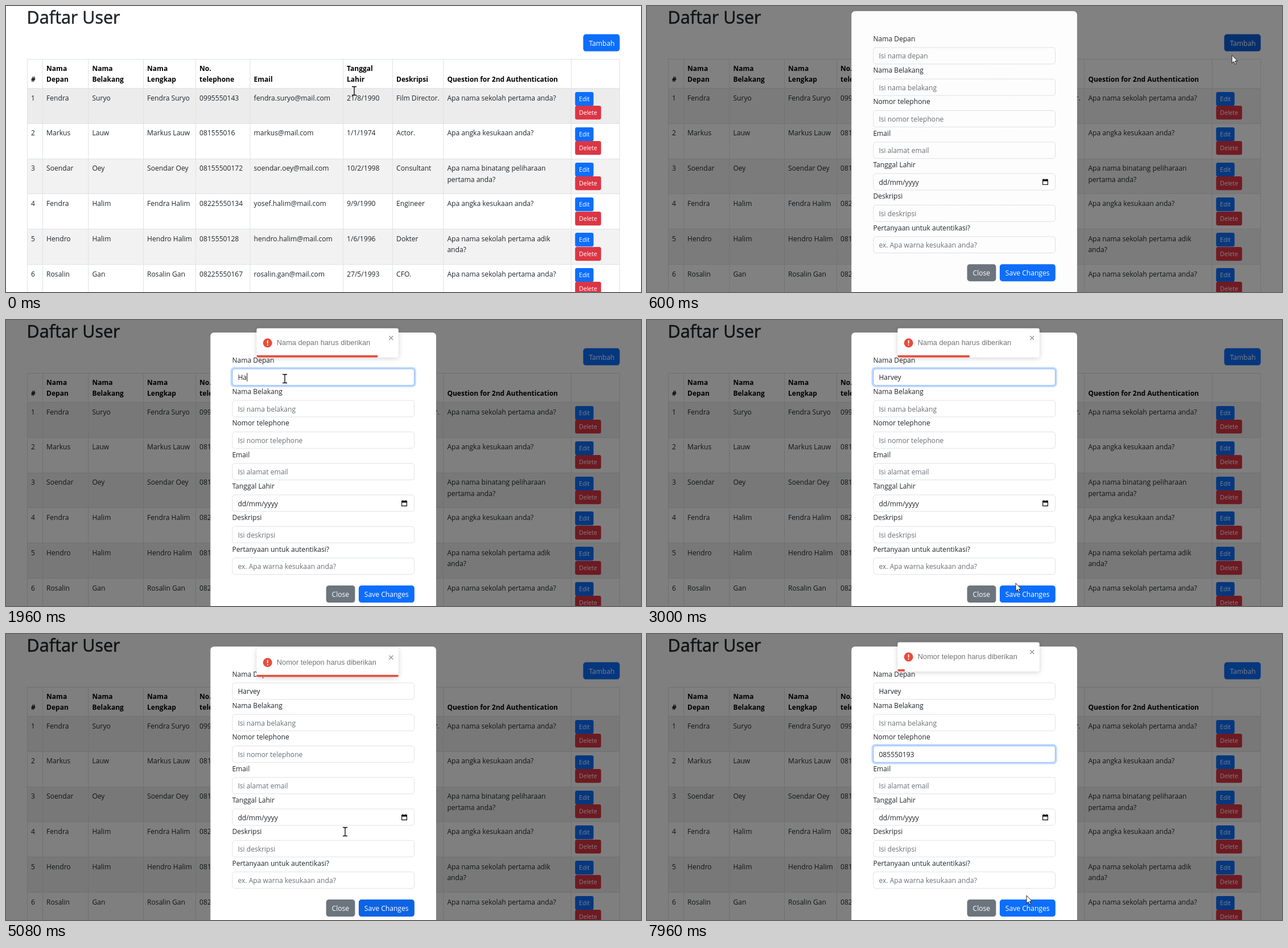
An HTML page for the animation above (8 s loop, 1116 by 502 pixels).

```html
<!DOCTYPE html>
<html lang="id">
<head>
<meta charset="utf-8">
<title>Daftar User</title>
<style>
html, body { margin: 0; width: 100%; height: 100%; overflow: hidden; background: #fff; }
svg { display: block; width: 1116px; height: 502px; }
text { font: 12.1px "Open Sans", "Noto Sans", sans-serif; fill: #212529; white-space: pre; }
.title { font-size: 30.5px; stroke: #212529; stroke-width: .6px; }
.head { font-size: 12px; font-weight: 700; fill: #000; }
.light { fill: #fff; }
.small { font-size: 10.6px; fill: #fff; }
.hint { fill: #6a6f75; }
.note { font: 12.8px "Liberation Sans", Arial, sans-serif; fill: #757575; }
.box { fill: #fff; stroke: #dee2e6; }
.toast { filter: drop-shadow(0 1px 4px rgba(0,0,0,.13)) drop-shadow(0 2px 6px rgba(0,0,0,.06)); }
</style>
</head>
<body>
<svg id="stage" viewBox="0 0 1116 502"></svg>
<script>
const LOOP = 8000;
const BLUE = [13, 110, 253], DARK = [11, 94, 215];
const stage = document.getElementById('stage');

function add(parent, tag, attrs = {}, content) {
  const el = document.createElementNS('http://www.w3.org/2000/svg', tag);
  for (const k in attrs) el.setAttribute(k, attrs[k]);
  if (content !== undefined) el.textContent = content;
  parent.appendChild(el);
  return el;
}
const label = (parent, x, y, str, cls = '') => add(parent, 'text', { x, y, class: cls }, str);
const rect = (parent, x, y, width, height, fill, rx = 0) =>
  add(parent, 'rect', { x, y, width, height, rx, fill });
const rgb = c => `rgb(${c.map(Math.round)})`;

// ---------- page with table ----------
const page = add(stage, 'g');
rect(page, 0, 0, 1116, 502, '#fff');
label(page, 36.6, 31, 'Daftar User', 'title');
const addButton = rect(page, 1014.4, 49.6, 64.2, 30, rgb(BLUE), 4.8);
label(page, 1024.4, 69.6, 'Tambah', 'light');

const cols = [37.5, 64.5, 144.8, 241.5, 333.5, 429, 592.5, 679.5, 768.8, 993.3, 1078.5];
const heads = ['|#', 'Nama|Depan', 'Nama|Belakang', 'Nama|Lengkap', 'No.|telephone',
  '|Email', 'Tanggal|Lahir', '|Deskripsi', '|Question for 2nd Authentication'];
const rows = [
  ['Fendra', 'Suryo', '0995550143', 'fendra.suryo@mail.com', '21/8/1990', 'Film Director.', 'Apa nama sekolah pertama anda?'],
  ['Markus', 'Lauw', '081555016', 'markus@mail.com', '1/1/1974', 'Actor.', 'Apa angka kesukaan anda?'],
  ['Soendar', 'Oey', '08155500172', 'soendar.oey@mail.com', '10/2/1998', 'Consultant', 'Apa nama binatang peliharaan|pertama anda?'],
  ['Fendra', 'Halim', '08225550134', 'yosef.halim@mail.com', '9/9/1990', 'Engineer', 'Apa angka kesukaan anda?'],
  ['Hendro', 'Halim', '0815550128', 'hendro.halim@mail.com', '1/6/1996', 'Dokter', 'Apa nama sekolah pertama adik|anda?'],
  ['Rosalin', 'Gan', '08225550167', 'rosalin.gan@mail.com', '27/5/1993', 'CFO.', 'Apa nama sekolah pertama anda?']
];
const TOP = 144.3, PITCH = 61.85, LINE = 19.2;
const cell = (col, y, str, cls) => str.split('|').forEach((s, i) =>
  s && label(page, cols[col] + 6.6, y + i * LINE, s, cls));

const stripes = rows.map((r, i) =>
  rect(page, 37.5, TOP + i * PITCH, 1041, PITCH, i % 2 ? '#fff' : '#f2f2f2'));
for (const x of cols) rect(page, x - .5, 93, 1, 409, '#dee2e6');
for (let i = -1; i < 6; i++)
  rect(page, 37, i < 0 ? 93 : Math.round(TOP - .4 + i * PITCH), 1042, 1, '#dee2e6');

function rowButton(y, width, fill, name) {
  rect(page, 1000.2, Math.round(y), width, 24.2, fill, 3.2);
  label(page, 1007, Math.round(y) + 16, name, 'small');
}
heads.forEach((h, i) => cell(i, 113.8, h, 'head'));
rows.forEach(([first, last, ...rest], i) => {
  const y = TOP + i * PITCH;
  [String(i + 1), first, last, `${first} ${last}`, ...rest]
    .forEach((s, c) => cell(c, y + 21.3, s));
  rowButton(y + 6.6, 32.4, rgb(BLUE), 'Edit');
  rowButton(y + 30.9, 45.6, '#dc3545', 'Delete');
});
const shade = rect(stage, 0, 0, 1116, 502, '#000');

// ---------- modal form ----------
const modal = add(stage, 'g');
rect(modal, 359.3, 22, 396.6, 540, '#fff', 6.4);
const fields = [
  ['Nama Depan', 'Isi nama depan'], ['Nama Belakang', 'Isi nama belakang'],
  ['Nomor telephone', 'Isi nomor telephone'], ['Email', 'Isi alamat email'],
  ['Tanggal Lahir', 'dd/mm/yyyy'], ['Deskripsi', 'Isi deskripsi'],
  ['Pertanyaan untuk autentikasi?', 'ex. Apa warna kesukaan anda?']
].map(([name, hint], i) => {
  const y = i * 55.3;
  label(modal, 397.4, y + 74.8, name);
  const ring = rect(modal, 394.5, y + 82.4, 326.2, 35.6, 'rgba(13,110,253,.25)', 7);
  const box = add(modal, 'rect', { x: 397.9, y: y + 85.8, width: 319.6, height: 28.9, rx: 4.5, class: 'box' });
  const text = label(modal, 407.4, y + 105.4, hint, i === 4 ? '' : 'hint');
  const caret = rect(modal, 407, y + 93, 1, 15, '#212529');
  return { hint, ring, box, text, caret };
});
add(modal, 'path', { d: 'M695.6 318h8.8v8.4h-8.8z', fill: 'none', stroke: '#000', 'stroke-width': 1.1 });
add(modal, 'path', { d: 'M695 317.4h10v3h-10zM696.8 316.2h1.2v2h-1.2zM702 316.2h1.2v2h-1.2z', fill: '#000' });
rect(modal, 562.6, 466.1, 50.8, 30, '#6c757d', 4.8);
label(modal, 572.6, 486.2, 'Close', 'light');
const saveButton = rect(modal, 619.9, 466.1, 97.9, 30, rgb(BLUE), 4.8);
label(modal, 629.8, 486.2, 'Save Changes', 'light');

// ---------- toast ----------
const toast = add(stage, 'g');
const clip = add(add(stage, 'defs'), 'clipPath', { id: 'card' });
rect(clip, 440.4, 14.6, 249.4, 51.2, '#000', 3.2);
add(toast, 'rect', { x: 440.4, y: 14.6, width: 249.4, height: 51.2, rx: 3.2, fill: '#fff', class: 'toast' });
add(toast, 'circle', { cx: 459.7, cy: 40.3, r: 8, fill: '#e74c3c' });
rect(toast, 458.8, 35.6, 1.8, 5.8, '#fff', .7);
add(toast, 'circle', { cx: 459.7, cy: 44, r: 1.1, fill: '#fff' });
const note = label(toast, 475.8, 44.4, '', 'note');
add(toast, 'path', { d: 'M673.2 28l7 7m0-7l-7 7', stroke: '#9a9a9a', 'stroke-width': 1.5 });
const bar = rect(add(toast, 'g', { 'clip-path': 'url(#card)' }), 440.4, 61.9, 249.4, 4, '#e74c3c');

// ---------- pointer ----------
const arrow = add(stage, 'path', {
  d: 'M0 0V14l3.2-3 2.2 5 2.2-1-2.2-4.8h4.4z', fill: '#fff', stroke: '#111', 'stroke-width': .9 });
const beam = add(stage, 'path', {
  d: 'M-4-7.5h3l1 1 1-1h3M0-6.5v13M-4 7.5h3l1-1 1 1h3', fill: 'none', stroke: '#000', 'stroke-width': 1.3 });

// ---------- motion ----------
const clamp = v => Math.min(1, Math.max(0, v));
const mix = (a, b, p) => a + (b - a) * p;
const smooth = p => p * p * (3 - 2 * p);

function bezier(x1, y1, x2, y2) {
  const at = (a, b, u) => 3 * a * u * (1 - u) ** 2 + 3 * b * u * u * (1 - u) + u ** 3;
  return x => {
    let lo = 0, hi = 1;
    for (let i = 0; i < 24; i++) {
      const m = (lo + hi) / 2;
      if (at(x1, x2, m) < x) lo = m; else hi = m;
    }
    return at(y1, y2, lo);
  };
}
const easeOut = bezier(0, 0, .58, 1), bounce = bezier(.215, .61, .355, 1);

// steps are [time, value, ...]; returns the values at t
function track(steps, t, ease) {
  const n = steps.findIndex(s => s[0] > t);
  if (n === 0) return steps[0].slice(1);
  if (n < 0) return steps[steps.length - 1].slice(1);
  const a = steps[n - 1], b = steps[n], p = ease((t - a[0]) / (b[0] - a[0]));
  return a.slice(1).map((v, i) => mix(v, b[i + 1], p));
}
// 0..1 amount of a state that fades in and out over 150 ms
const fade = (t, spans) => Math.max(...spans.map(([on, off]) =>
  Math.min(clamp((t - on) / 150), 1 - clamp((t - off) / 150))));
const within = (t, spans) => spans.some(([a, b]) => t >= a && t < b);

const OPEN = 453;
const path = [
  [0, 612, 149], [30, 612, 149], [420, 1054, 59], [550, 1054, 59], [880, 650, 484], [970, 650, 484],
  [1360, 506, 214], [1640, 490, 103], [2540, 490, 103], [3000, 648, 462], [3090, 655, 474],
  [3340, 558, 213], [4080, 506, 206], [4280, 506, 206], [4580, 655, 484], [4900, 655, 484],
  [5080, 596, 347], [5400, 545, 211], [7590, 545, 211], [7960, 667, 459]
];
const beamTimes = [[0, 130], [1560, 2620], [3240, 4360], [5050, 7650]];
const hovers = [[850, 1010], [3000, 3130], [4500, 5030]];
const drops = [
  [1354, 20], [1459, -8], [1564, 4], [1634, 0], [4525, 0], [4665, -8], [4805, 16], [4840, 16],
  [5055, -1000], [5056, 14], [5080, 10], [5240, 0]
];
const inputs = [
  { field: fields[0], value: 'Harvey', focus: [1640, 4640], keys: [1810, 1940, 2060, 2190, 2330, 2470] },
  { field: fields[2], value: '085550193', focus: [5420, 9000],
    keys: [5720, 5850, 6080, 6320, 6600, 6800, 7000, 7200, 7390] }
];

function drawInput({ field, value, focus, keys }, t) {
  const typed = keys.filter(k => k <= t).length;
  const lit = fade(t, [focus]);
  field.text.textContent = typed ? value.slice(0, typed) : field.hint;
  field.text.setAttribute('class', typed ? '' : 'hint');
  field.ring.setAttribute('opacity', lit);
  field.box.style.stroke = rgb([mix(222, 134, lit), mix(226, 183, lit), mix(230, 254, lit)]);
  const last = typed ? keys[typed - 1] : focus[0];
  const shown = within(t, [focus]) && (t - last) % 1000 < 500;
  field.caret.setAttribute('opacity', shown ? 1 : 0);
  field.caret.setAttribute('x', 407.6 + (typed ? field.text.getComputedTextLength() : 0));
}

function draw(t) {
  stripes[0].setAttribute('fill', t < 60 ? '#ececec' : '#f2f2f2');
  const tint = k => rgb(BLUE.map((v, i) => mix(v, DARK[i], k)));
  addButton.setAttribute('fill', tint(fade(t, [[340, 600]])));
  saveButton.setAttribute('fill', tint(fade(t, hovers)));

  const seen = clamp((t - OPEN) / 150);
  shade.setAttribute('opacity', seen / 2);
  modal.setAttribute('opacity', seen);
  modal.setAttribute('transform', `translate(0 ${-40 * (1 - easeOut(clamp((t - OPEN) / 300)))})`);
  inputs.forEach(i => drawInput(i, t));

  const second = t > 5000;
  toast.setAttribute('visibility', t < 1354 ? 'hidden' : 'visible');
  toast.setAttribute('transform', `translate(0 ${track(drops, t, bounce)[0]})`);
  note.textContent = `${second ? 'Nomor telepon' : 'Nama depan'} harus diberikan`;
  bar.setAttribute('width', 249.4 * (1 - clamp((t - (second ? 5111 : 1520)) / 3000)));

  const [x, y] = track(path, t, smooth);
  const isBeam = within(t, beamTimes);
  arrow.setAttribute('visibility', isBeam ? 'hidden' : 'visible');
  beam.setAttribute('visibility', isBeam ? 'visible' : 'hidden');
  (isBeam ? beam : arrow).setAttribute('transform', `translate(${x} ${y})`);
}

fields.forEach(f => { f.ring.setAttribute('opacity', 0); f.caret.setAttribute('opacity', 0); });
const start = performance.now();
function tick(now) {
  draw(Math.max(0, now - start) % LOOP);
  requestAnimationFrame(tick);
}
draw(0);
requestAnimationFrame(tick);
</script>
</body>
</html>
```
